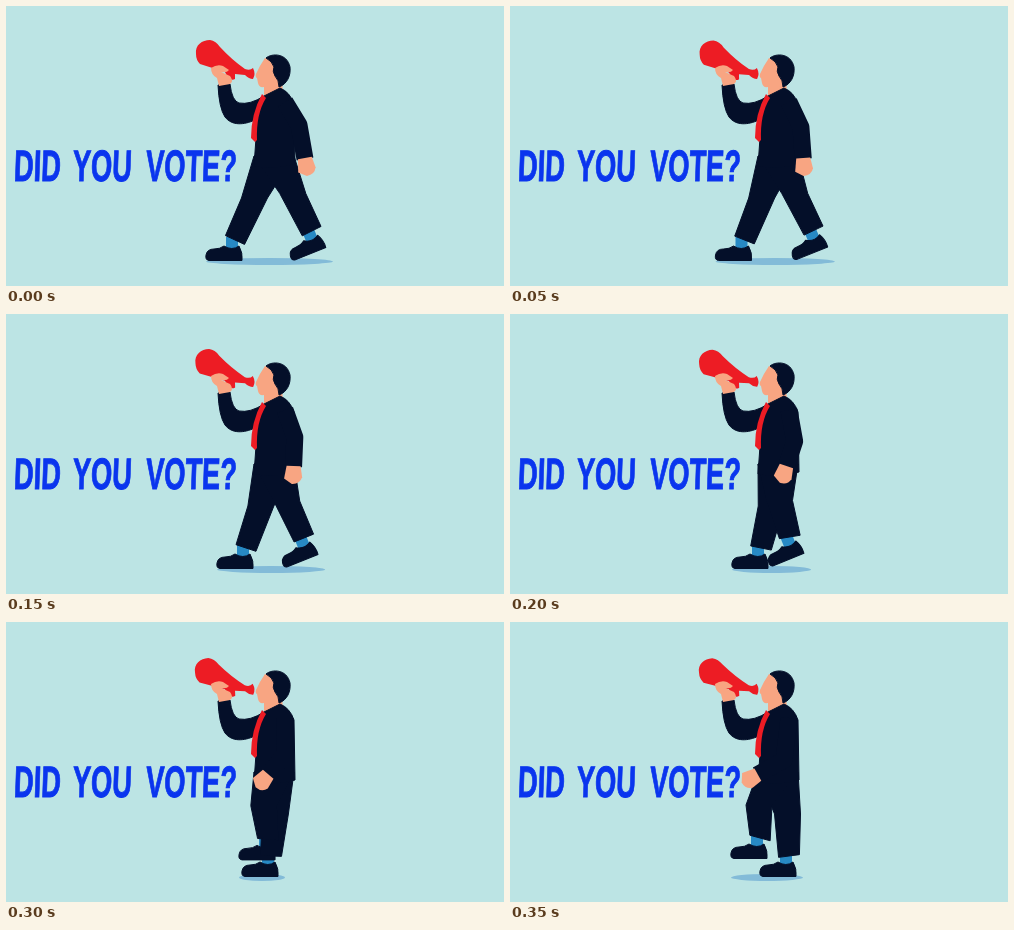
Recreate the animation shown at these times as an HTML page. Size 498x280 px, loop 400 ms.

```html
<!DOCTYPE html>
<html lang="en">
<head>
<meta charset="utf-8">
<title>Did you vote?</title>
<style>
  html, body { margin: 0; width: 100%; height: 100%; overflow: hidden; background: #bce4e4; }
  svg { display: block; width: 100%; height: 100%; }
  text { font: bold 44px "Liberation Sans", Arial, sans-serif; fill: #0a35ee; stroke: #0a35ee; stroke-width: 1; }
  .suit { fill: #040f29; stroke: #040f29; stroke-linejoin: round; }
  .skin { fill: #f8a582; }
  .red { fill: #ed1c24; }
  .sock { fill: #2789c4; }
  #sleeve { fill: none; stroke-width: 17; }
</style>
</head>
<body>
<svg viewBox="0 0 498 280">
  <defs>
    <g id="shoe">
      <path class="sock" d="M-16-9V-24H-4V-9Z"/>
      <path class="suit" d="M0-.5H-33Q-37-1-36-6Q-35-12-28-12Q-22-12-18-15Q-10-10-3-15Q1-8 0-.5Z"/>
    </g>
  </defs>
  <rect width="498" height="280" fill="#bce4e4"/>
  <g transform="translate(0 175) skewX(-2) scale(.62 1)">
    <text x="12">DID</text><text x="107">YOU</text><text x="225">VOTE?</text>
  </g>

  <ellipse id="shadow" cy="255.5" ry="3.5" fill="#83bbd8"/>
  <use id="stanceFoot" href="#shoe"/>
  <use id="swingFoot" href="#shoe"/>
  <path id="stanceLeg" class="suit"/>
  <path id="swingLeg" class="suit"/>

  <path class="skin" d="M259 52L274 56L277 86L258 92L258 81Q253 82 252 77L251 72Q249 71 250 68Q254 59 259 52Z"/>
  <path class="suit" d="M260 52C266 47 281 47 284 61C285 70 281 78 273 81Q273 74 269 70Q266 65 268 61Q266 55 260 52Z"/>
  <path class="suit" d="M258 90L274 82Q284 86 288 98L289 158Q268 164 248 160L250 132L249 114C238 119 226 120 219 111Q213 102 212 79L224 78Q226 95 233 97Q244 99 258 90Z"/>
  <path class="red" d="M256 88L260 92Q250 108 251 134L249 136L245 132Q245 108 256 88Z"/>

  <path id="megaphone" class="red" d="M190 48C189 39 196 34 204 34Q210 35 214 41Q226 54 239 63Q244 65 247 62Q250 68 247 73Q243 73 239 69L229 68L229 73Q226 75 222 72L219 66L194 58Q190 54 190 48Z"/>
  <path class="skin" d="M205 62Q211 58 217 60L223 64Q221 67 215 66L224 70Q228 75 224 78L213 80L211 72Q205 69 205 62Z"/>

  <path id="sleeve" class="suit"/>
  <path id="hand" class="skin" d="M-7-1H7L9 10Q7 17-1 17L-9 12Z"/>
</svg>
<script>
const STEP = 50;
// Share of the stride covered at each step of the loop.
const stride = [0, .11, .22, .22, .44, .58, .72, 1];
const HIP = { x: 268, y: 150 };

const mix = (a, b, k) => a + (b - a) * k;
const clamp = k => Math.min(1, Math.max(0, k));
const smooth = k => k * k * (3 - 2 * k);
const degrees = radians => radians * 180 / Math.PI;

const set = (id, attrs) => {
  for (const name in attrs) document.getElementById(id).setAttribute(name, attrs[name]);
};

// A tapered trouser leg from the hip to a shoe; the cuff is square to the leg.
function drawLeg(name, heel, angle, kneeShift) {
  const a = angle * Math.PI / 180;
  const ankle = {
    x: heel.x - 7 * Math.cos(a) + 21 * Math.sin(a),
    y: heel.y - 7 * Math.sin(a) - 21 * Math.cos(a)
  };
  const dx = ankle.x - HIP.x, dy = ankle.y - HIP.y;
  const half = 10.5 / Math.hypot(dx, dy);
  const cx = dy * half, cy = -dx * half;
  const knee = { x: HIP.x + dx / 2 + kneeShift, y: HIP.y + dy / 2 };
  set(name + "Leg", {
    d: `M${HIP.x - 20} ${HIP.y}L${knee.x - 13} ${knee.y}L${ankle.x - cx} ${ankle.y - cy}` +
       `L${ankle.x + cx} ${ankle.y + cy}L${knee.x + 13} ${knee.y}L${HIP.x + 20} ${HIP.y}Z`
  });
  set(name + "Foot", { transform: `translate(${heel.x} ${heel.y}) rotate(${angle})` });
}

function drawArm(p) {
  const elbow = { x: mix(293, 274, p), y: mix(119, 138, p) };
  const wrist = { x: mix(299, 247, p), y: 153 };
  const turn = degrees(Math.atan2(elbow.x - wrist.x, wrist.y - elbow.y));
  set("sleeve", { d: `M279 96L${elbow.x} ${elbow.y}L${wrist.x} ${wrist.y}` });
  set("hand", { transform: `translate(${wrist.x} ${wrist.y}) rotate(${turn})` });
}

function draw(p) {
  const stance = { x: mix(236, 286, p), y: 255 };
  const swing = { x: mix(320, 257, smooth(p)), y: mix(242, 237, p) };
  drawLeg("stance", stance, 0, 4 * p);
  drawLeg("swing", swing, -22 * clamp((.72 - p) / .28), -10 * p);
  drawArm(p);

  const left = Math.min(stance.x, swing.x) - 36;
  const right = Math.max(stance.x, swing.x) + 7;
  set("shadow", { cx: (left + right) / 2, rx: (right - left) / 2 });
  set("megaphone", { transform: `rotate(${3 * ((1 - p) ** 3 - 1)} 244 68)` });
}

const start = performance.now();
function tick() {
  const elapsed = Math.max(0, performance.now() - start);
  draw(stride[Math.floor(elapsed / STEP) % stride.length]);
  requestAnimationFrame(tick);
}
tick();
</script>
</body>
</html>
```
